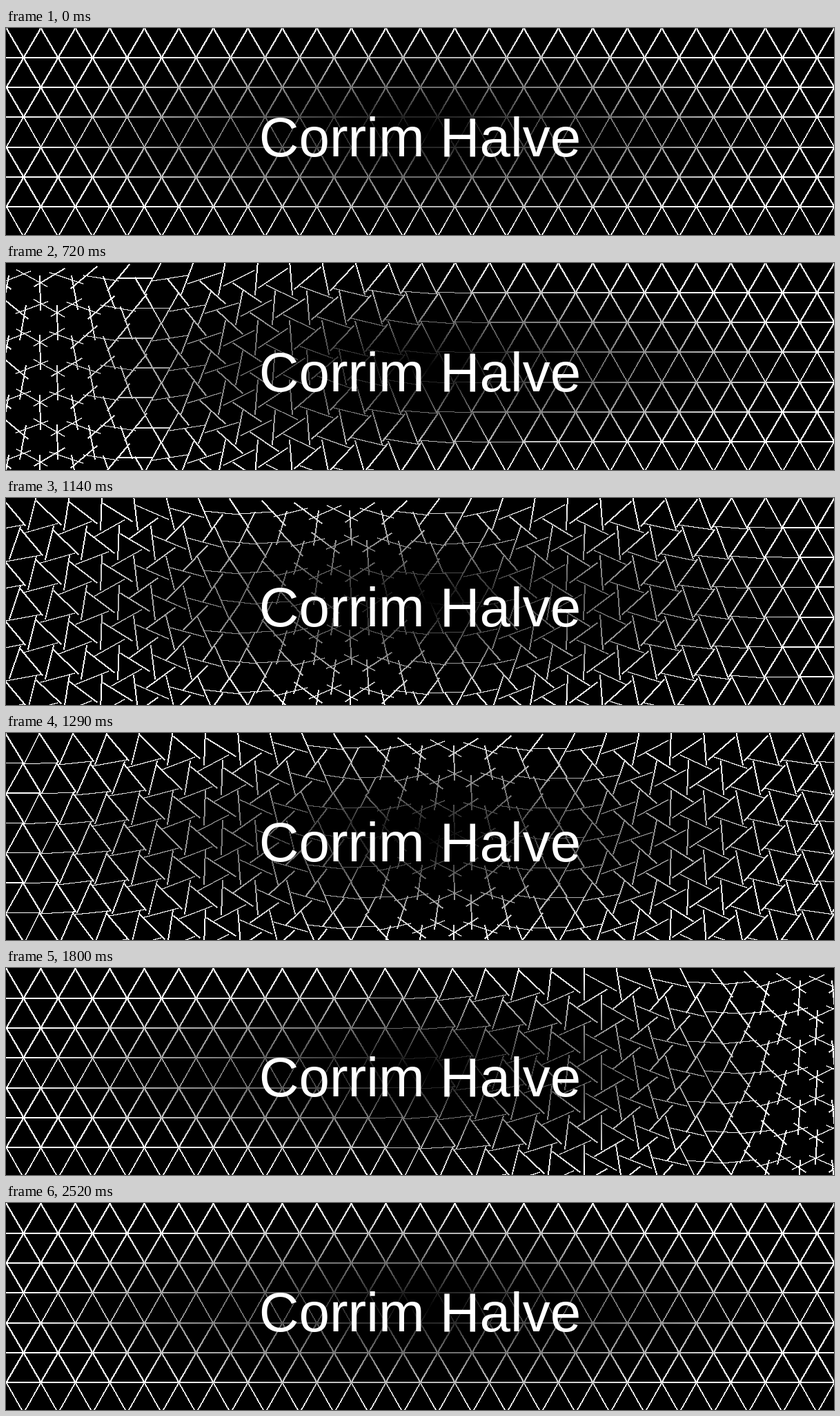
An HTML page with a canvas that plays this animation: 1200x300 px, repeating every 7.17 s.

```html
<!DOCTYPE html>
<html lang="en">
<head>
<meta charset="utf-8">
<title>Turning lattice</title>
<style>
  html, body { margin: 0; width: 100%; height: 100%; overflow: hidden; background: #000; }
  canvas, svg { position: absolute; left: 0; top: 0; display: block; }
  text { font: 80px "Liberation Sans", Arial, sans-serif; fill: #fff; text-anchor: middle; }
</style>
</head>
<body>
<canvas id="stage" width="1200" height="300"></canvas>
<svg width="1200" height="300"><text x="600" y="186">Corrim Halve</text></svg>
<script>
const W = 1200, H = 300;
const SIDE = 50, ROW = SIDE * Math.sqrt(3) / 2;
const STEP_MS = 30, LOOP_MS = 7170;
const TURN_STEPS = 45, COLUMN_DELAY = 1.6; // both in steps

const ctx = document.getElementById('stage').getContext('2d');
const image = ctx.createImageData(W, H);
const pixels = new Uint32Array(image.data.buffer);

// Line brightness grows away from the centre of the stage.
const shade = new Uint32Array(W * H);
for (let y = 0; y < H; y++) {
  for (let x = 0; x < W; x++) {
    const r = Math.hypot((x - W / 2) / (W / 2), (y - H / 2) / (H / 2));
    shade[y * W + x] = 0xff000000 + Math.round(255 * Math.min(1, r)) * 0x010101;
  }
}

// Hard-edged fill of a convex polygon, sampled on whole pixel rows.
function fillPolygon(points) {
  const ys = points.map(p => p[1]);
  const bottom = Math.min(H - 1, Math.max(...ys));
  for (let y = Math.max(0, Math.min(...ys)); y <= bottom; y++) {
    let left = Infinity, right = -Infinity;
    points.forEach(([x0, y0], i) => {
      const [x1, y1] = points[(i + 1) % points.length];
      if (y < Math.min(y0, y1) || y > Math.max(y0, y1)) return;
      const crossings = y0 === y1 ? [x0, x1] : [x0 + (x1 - x0) * (y - y0) / (y1 - y0)];
      left = Math.min(left, ...crossings);
      right = Math.max(right, ...crossings);
    });
    const end = Math.min(W - 1, Math.ceil(right - 0.5));
    for (let x = Math.max(0, Math.round(left)); x <= end; x++) {
      pixels[y * W + x] = shade[y * W + x];
    }
  }
}

// A lattice edge on whole pixels, widened to one side of its direction.
function edge(cx, cy, angle) {
  const ux = Math.cos(angle) * SIDE / 2, uy = Math.sin(angle) * SIDE / 2;
  const snap = v => Math.floor(v + 1e-6);
  const x0 = snap(cx - ux), y0 = snap(cy - uy);
  const x1 = snap(cx + ux), y1 = snap(cy + uy);
  const length = Math.hypot(x1 - x0, y1 - y0);
  const sideX = Math.round((y1 - y0) / length), sideY = Math.round((x1 - x0) / length);
  fillPolygon([[x0, y0 + sideY], [x1, y1 + sideY], [x1 + sideX, y1], [x0 + sideX, y0]]);
}

function rotation(column, step) {
  const u = Math.min(1, Math.max(0, (step - column * COLUMN_DELAY) / TURN_STEPS));
  return Math.PI * (1 - Math.cos(Math.PI * u)) / 2;
}

function draw(step) {
  pixels.fill(0xff000000);
  for (let row = 0; row * ROW < H; row++) {
    const top = row * ROW;
    for (let column = 0; column * SIDE <= W; column++) {
      const x = column * SIDE + (row % 2) * SIDE / 2;
      const turn = rotation(column, step);
      edge(x + SIDE / 4, top + ROW / 2, Math.PI / 3 + turn);
      edge(x, top + ROW, Math.PI + turn);
      edge(x - SIDE / 4, top + ROW / 2, Math.PI * 5 / 3 + turn);
    }
  }
  ctx.putImageData(image, 0, 0);
}

let shown = -1;
function tick() {
  const step = Math.floor(performance.now() % LOOP_MS / STEP_MS);
  if (step !== shown) draw(shown = step);
  requestAnimationFrame(tick);
}
tick();
</script>
</body>
</html>
```
